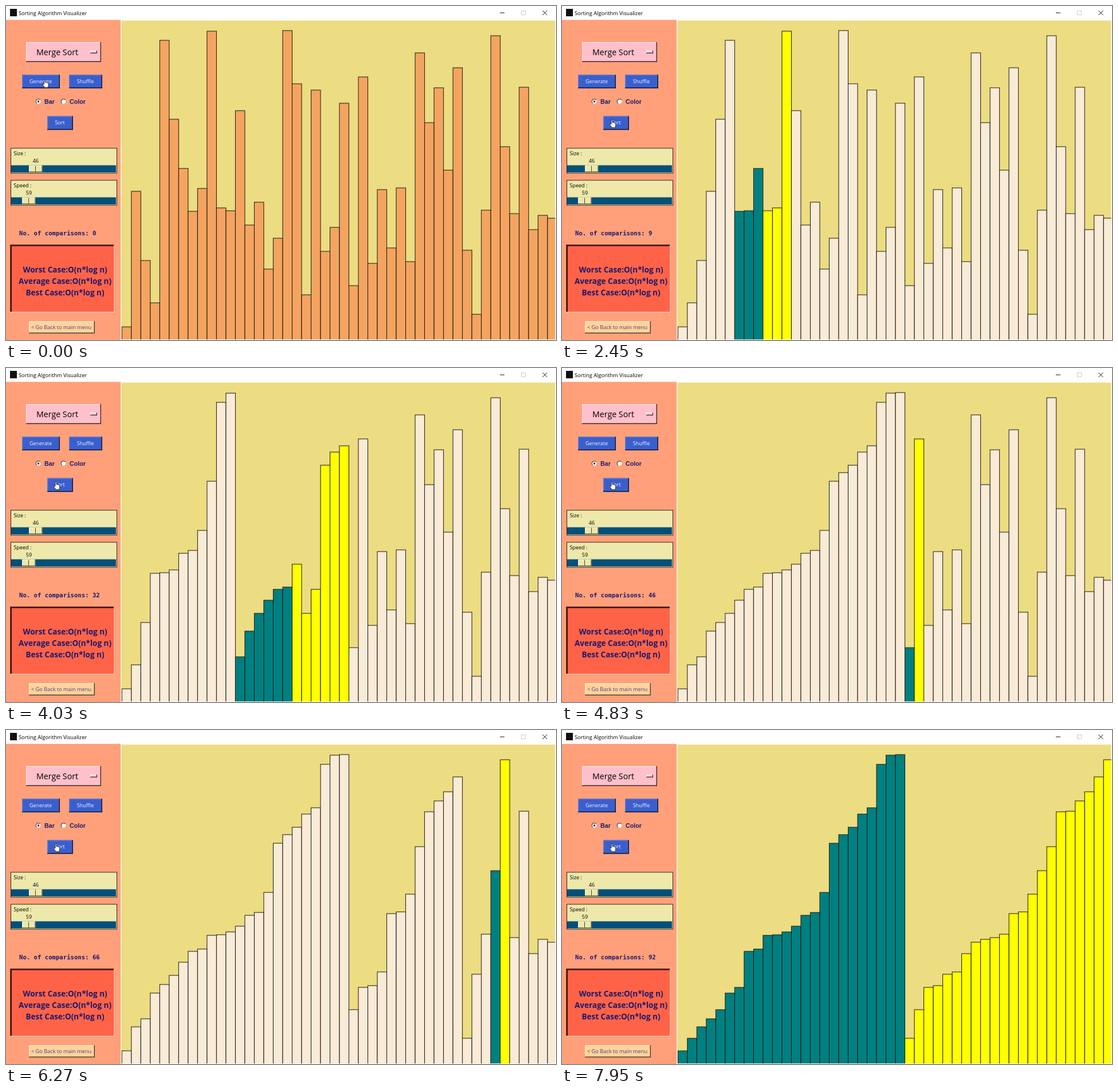
Animation, 960 px wide and 584 px high, one loop 8000 ms. Source, as an HTML page:

```html
<!DOCTYPE html>
<html lang="en">
<head>
<meta charset="utf-8">
<title>Sorting Algorithm Visualizer</title>
<style>
html, body { margin: 0; width: 100%; height: 100%; overflow: hidden; background: #fff; }
svg { display: block; width: 960px; height: 584px; font: 9px "Open Sans", sans-serif; }
.mid { text-anchor: middle; }
.navy { fill: #191970; }
.radio { font: bold 10.7px "Liberation Sans", sans-serif; }
.count { font: bold 10.63px "DejaVu Sans Mono", monospace; white-space: pre; }
.cases { font-size: 13.5px; font-weight: 700; }
</style>
</head>
<body>
<svg id="stage" viewBox="0 0 960 584">
  <rect width="960" height="584" fill="#fff"/>
  <rect x="7" y="5" width="12" height="13" fill="#111"/>
  <text x="22" y="15.7" font-size="9.25">Sorting Algorithm Visualizer</text>
  <g fill="none" stroke="#111">
    <path d="M862 12h8M936.5 8l8 8M944.5 8l-8 8"/>
    <rect x="899.5" y="8.5" width="7" height="7" stroke="#ccc"/>
  </g>
  <rect y="24.3" width="200.2" height="560" fill="#ffa07a"/>
  <g id="panel"></g>
  <rect x="201.5" y="25.5" width="757" height="557.5" fill="#ecdc82"/>
  <clipPath id="plot"><rect x="201.5" y="25.5" width="757" height="557.5"/></clipPath>
  <g id="bars" clip-path="url(#plot)" stroke="#1a1710"></g>
  <path id="hand" fill="#fff" stroke="#222" stroke-width=".9" stroke-linejoin="round"
    d="M3 8V1.6Q3 .5 4 .5T5 1.6V5Q6.2 4.3 7 5.3Q8.2 4.8 8.8 5.8Q10.6 5.4 10.6 7.4V10.5L9.6 14H4.2L.8 9.3Q.2 7.6 1.5 7.6Z"/>
</svg>
<script>
const NS = "http://www.w3.org/2000/svg";
const byId = id => document.getElementById(id);
const panel = byId("panel"), hand = byId("hand");

function add(parent, tag, attrs, content) {
  const el = document.createElementNS(NS, tag);
  for (const key in attrs) el.setAttribute(key, attrs[key]);
  if (content) el.textContent = content;
  return parent.appendChild(el);
}
const box = (x, y, width, height, fill, extra) =>
  add(panel, "rect", { x, y, width, height, fill, ...extra });
const label = (x, y, str, cls = "", extra) =>
  add(panel, "text", { x, y, class: cls, ...extra }, str);

// Box with a two-tone bevel; returns the two edge paths.
function bevel(x, y, w, h, fill, light, dark, width = 1.4) {
  box(x, y, w, h, fill);
  const d = width / 2;
  const edge = (path, stroke) => add(panel, "path", { d: path, fill: "none", stroke, "stroke-width": width });
  return [
    edge(`M${x + d} ${y + h}V${y + d}H${x + w}`, light),
    edge(`M${x} ${y + h - d}H${x + w - d}V${y}`, dark)
  ];
}

const BLUE = "#3a5fcd", BLUE_LIGHT = "#5578dc", BLUE_DARK = "#14172c";
function button(x, y, w, str) {
  const edges = bevel(x, y, w, 24, BLUE, BLUE_LIGHT, BLUE_DARK);
  return { edges, text: label(x + w / 2 - .5, y + 14.7, str, "mid", { fill: "#f4f4ff" }) };
}

function radio(x, str, on) {
  add(panel, "circle", { cx: x, cy: 167, r: 4.2, fill: "#fff", stroke: "#d8b8a8" });
  add(panel, "path", { d: `M${x - 3} 170A4.2 4.2 0 0 1 ${x + 3} 164`, fill: "none", stroke: "#444", "stroke-width": 1.2 });
  if (on) add(panel, "circle", { cx: x, cy: 167, r: 1.7, fill: "#111" });
  label(x + 10.5, 171, str, "radio navy");
}

function slider(y, name, value, knob) {
  box(8.5, y + .7, 185, 43.6, "#eee8aa", { stroke: "#2b2718" });
  label(13.5, y + 12.7, name);
  label(knob + 12, y + 26, value, "mid");
  box(9, y + 30.5, 183, 12.5, "#00507a");
  bevel(knob, y + 30.7, 23.5, 11.8, "#eee8aa", "#fffbe0", "#3d3a26", 1);
  add(panel, "path", { d: `M${knob + 11.5} ${y + 31.5}v10`, stroke: "#4a4630" });
}

bevel(35, 63, 131, 35, "#ffc0cb", "#ffdbe1", "#3a2a2e");
label(89.5, 86, "Merge Sort", "mid", { "font-size": 14.2 });
bevel(147, 78, 12, 5, "#ffc0cb", "#fff", "#3a2a2e", 1.2);
button(28, 120, 66, "Generate");
button(110, 120, 58, "Shuffle");
radio(56.5, "Bar", true);
radio(100.5, "Color", false);
const sortBtn = button(72, 192.5, 45, "Sort");
slider(248, "Size :", "46", 40);
slider(304, "Speed :", "59", 28);
const counter = label(23, 400.7, "No. of comparisons: 0", "count navy");
bevel(7, 417, 182.5, 119, "#ff6347", "#7a3022", "#ffc9b8", 1.2);
add(panel, "path", { d: "M9 534.5V419H188", fill: "none", stroke: "#0c0504", "stroke-width": 1.6 });
["Worst", "Average", "Best"].forEach((name, i) =>
  label(103, 466 + 20 * i, name + " Case:O(n*log n)", "cases navy mid"));
bevel(40, 551, 115, 21.5, "#ffd39b", "#ffe9c8", "#4a3c28");
label(96.5, 565, "< Go Back to main menu", "mid", { "font-size": 9.2, fill: "#483d8b" });

// Top edge of each bar; a larger number is a shorter bar.
const tops = [
  561, 324, 445, 519, 60, 198, 284, 359, 319, 44, 353, 358, 183, 383, 343, 460,
  406, 43, 136, 505, 147, 429, 387, 170, 489, 124, 450, 321, 423, 318, 447, 82,
  204, 143, 287, 108, 427, 539, 357, 52, 246, 363, 142, 391, 366, 371
];
const PITCH = 16.51;
const bars = tops.map((_, i) =>
  add(byId("bars"), "rect", { x: 202.3 + PITCH * i, width: PITCH }));

// Record the picture after every write of the merge sort.
const steps = [];
function record(data) {
  let count = 0;
  function sort(l, r) {
    if (l >= r) return;
    const m = (l + r) >> 1;
    sort(l, m);
    sort(m + 1, r);
    const a = data.slice(l, m + 1), b = data.slice(m + 1, r + 1);
    for (let k = l; a.length || b.length; k++) {
      const both = a.length && b.length;
      const left = both ? a[0] >= b[0] : a.length > 0;
      data[k] = (left ? a : b).shift();
      steps.push({ data: [...data], l, m, r, count });
      if (both && left) count++;
    }
  }
  sort(0, data.length);
}
record([...tops]);

const LOOP = 8000, START = 1710, PRESS = 1480;

// The screen refreshes about every 47 ms, in runs that begin at these times.
const RUNS = [0, 200, 1020, START, 2550, 3390, 4230, 5070, 5890, 6700, 7520];
const TICK = 140 / 3;
function snap(t) {
  const run = RUNS.filter(r => r <= t).pop();
  return run + TICK * Math.floor((t - run) / TICK + .25);
}

function stepAt(t) {
  const x = (t - START - 5) / 3120;
  const n = Math.floor(.3 + 114 * x - 1.9 * x * x);
  return steps[Math.max(0, Math.min(n, steps.length - 1))];
}

function drawBars(step) {
  bars.forEach((bar, i) => {
    const top = (step ? step.data : tops)[i];
    let fill = "#f4a460";
    if (step) {
      const active = i >= step.l && i <= step.r;
      fill = !active ? "#faebd7" : i <= step.m ? "#008080" : "#ffff00";
    }
    bar.setAttribute("y", top);
    bar.setAttribute("height", 590 - top);
    bar.setAttribute("fill", fill);
  });
  counter.textContent = "No. of comparisons: " + (step ? step.count : 0);
}

function drawHand(t) {
  const u = t < 200 ? 0 : Math.min(1, (t - 150) / 1100);
  const p = u * u * (3 - 2 * u);
  hand.setAttribute("transform", `translate(${63.5 + 19.5 * p} ${128.7 + 70 * p})`);
}

function drawPress(down) {
  const [tl, br] = sortBtn.edges;
  tl.setAttribute("stroke", down ? BLUE_DARK : BLUE_LIGHT);
  br.setAttribute("stroke", down ? BLUE_LIGHT : BLUE_DARK);
  sortBtn.text.setAttribute("transform", down ? "translate(1 1)" : "");
}

function render(t) {
  const shown = snap(t);
  drawBars(t >= START ? stepAt(shown) : null);
  drawHand(shown);
  drawPress(t >= PRESS && t < START);
}

function loop() {
  render(performance.now() % LOOP);
  requestAnimationFrame(loop);
}
loop();
</script>
</body>
</html>
```
